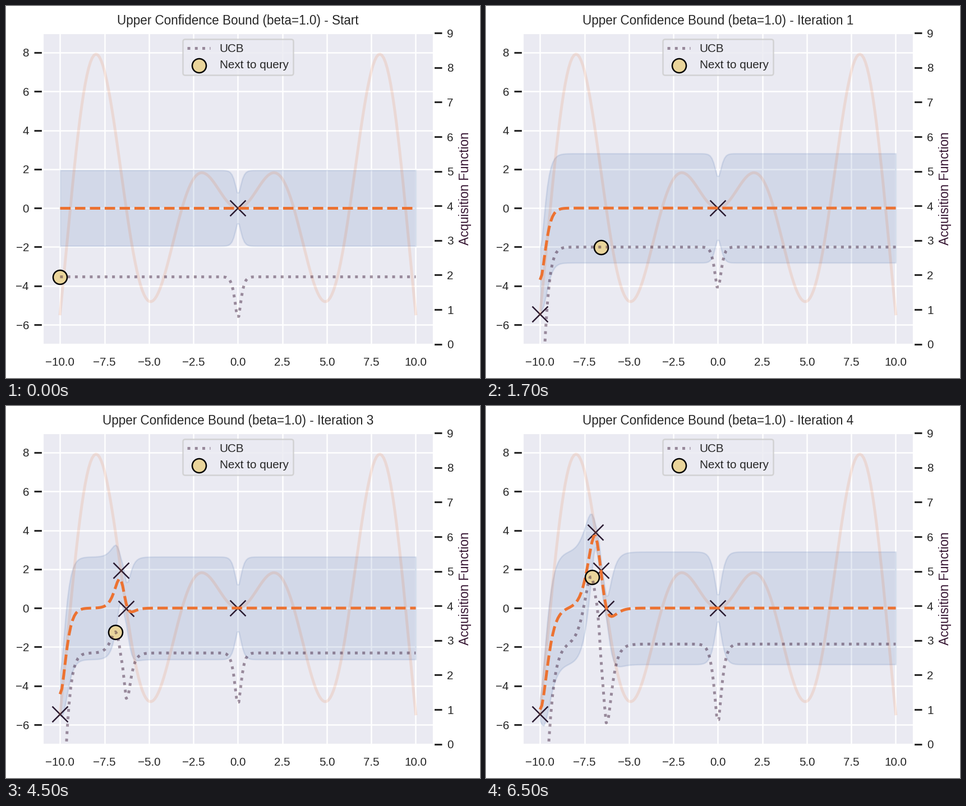
Animation of 845x663 px, one loop 8000 ms. Source, as a matplotlib script:

```python
import numpy as np
import matplotlib.pyplot as plt
from matplotlib.animation import FuncAnimation

W, H, DPI = 845, 663, 180
INK, ORANGE, BLUE, PLUM, SAND = "#262626", "#EC7231", "#4C72B0", "#351431", "#EAD59B"
PANEL = "#EAEAF2"

plt.rcParams.update({
    "font.family": "Liberation Sans", "text.color": INK,
    "axes.facecolor": PANEL, "axes.edgecolor": "white", "axes.linewidth": 1.25,
    "axes.axisbelow": True, "axes.titlesize": 9, "axes.labelsize": 9,
    "grid.color": "white", "grid.linewidth": 1,
    "xtick.labelsize": 8.25, "ytick.labelsize": 8.25,
    "xtick.color": INK, "ytick.color": INK,
    "xtick.major.size": 6, "ytick.major.size": 6,
    "ytick.major.width": 1.25, "xtick.bottom": False,
    "legend.fontsize": 8.25, "patch.linewidth": 1, "lines.linewidth": 2,
})


def objective(x):
    return x * np.sin(x)


def matern(a, b, length):
    r = np.sqrt(5) * np.abs(a[:, None] - b[None, :]) / length
    return (1 + r + r**2 / 3) * np.exp(-r)


def log_posterior(theta, x, y):
    """Log marginal likelihood plus gamma priors on the hyperparameters."""
    length, scale, noise = np.exp(theta)
    cov = scale * matern(x, x, length) + noise * np.eye(len(x))
    fit = -0.5 * (y @ np.linalg.solve(cov, y) + np.linalg.slogdet(cov)[1])
    prior = (2 * np.log(length) - 6 * length + np.log(scale) - 0.15 * scale
             + 0.1 * np.log(noise) - 0.05 * noise)
    return fit + prior


def fit_parameters(x, y):
    """Pattern search for the most probable length, scale and noise."""
    theta = np.log([1 / 3, 20 / 3, 2.0])
    best, step = log_posterior(theta, x, y), 0.3
    while step > 1e-4:
        improved = False
        for move in np.vstack([np.eye(3), -np.eye(3)]) * step:
            value = log_posterior(theta + move, x, y)
            if value > best:
                theta, best, improved = theta + move, value, True
        if not improved:
            step /= 2
    return np.exp(theta)


def predict(x, y, at):
    length, scale, noise = fit_parameters(x, y)
    cov = scale * matern(x, x, length) + noise * np.eye(len(x))
    cross = scale * matern(at, x, length)
    mean = cross @ np.linalg.solve(cov, y)
    var = scale - np.sum(cross * np.linalg.solve(cov, cross.T).T, axis=1)
    return mean, np.sqrt(np.maximum(var, 0))


grid = np.linspace(-10, 10, 200)
queries = [0, 34, 37, 31, 29]
samples = np.r_[0.0, grid[queries]]
stages = []
for count in range(1, 6):
    seen = samples[:count]
    stages.append((seen, *predict(seen, objective(seen), grid)))

fig = plt.figure(figsize=((W + 1e-6) / DPI, (H + 1e-6) / DPI), dpi=DPI, facecolor="white")
ax = fig.add_axes([64.7 / W, 1 - 602.7 / H, 697.5 / W, 554.4 / H])
ax.set(xlim=(-11, 11), ylim=(-7, 9), xticks=np.arange(-10, 11, 2.5),
       yticks=range(-6, 9, 2))
ax.grid(True)
title = ax.set_title("")
ax.plot(grid, objective(grid), color=ORANGE, alpha=0.15)
mean_line, = ax.plot([], [], "--", color=ORANGE)
crosses = ax.scatter([], [], s=125, marker="x", color="#2A1A30", linewidths=1, zorder=1.5)

acq = ax.twinx()
acq.set(ylim=(0, 9), yticks=range(10))
acq.set_ylabel("Acquisition Function", color=PLUM)
ucb_line, = acq.plot([], [], ":", color=PLUM, alpha=0.45, label="UCB")
target = acq.scatter([], [], s=100, color=SAND, edgecolors="black", linewidths=1,
                     label="Next to query")
acq.legend(loc="upper center")
bands = []


def update(frame):
    stage = (frame + 3) // 4
    seen, mean, std = stages[stage]
    ucb = mean + std
    name = f"Iteration {stage}" if stage else "Start"
    title.set_text(f"Upper Confidence Bound (beta=1.0) - {name}")
    while bands:
        bands.pop().remove()
    bands.append(ax.fill_between(grid, mean - std, ucb, color=BLUE, alpha=0.15))
    mean_line.set_data(grid, mean)
    ucb_line.set_data(grid, ucb)
    crosses.set_offsets(np.c_[seen, objective(seen)])
    target.set_offsets([[grid[queries[stage]], ucb[queries[stage]]]])


anim = FuncAnimation(fig, update, frames=16, interval=500, init_func=lambda: update(0),
                     repeat=True, repeat_delay=0)
plt.show()
```
